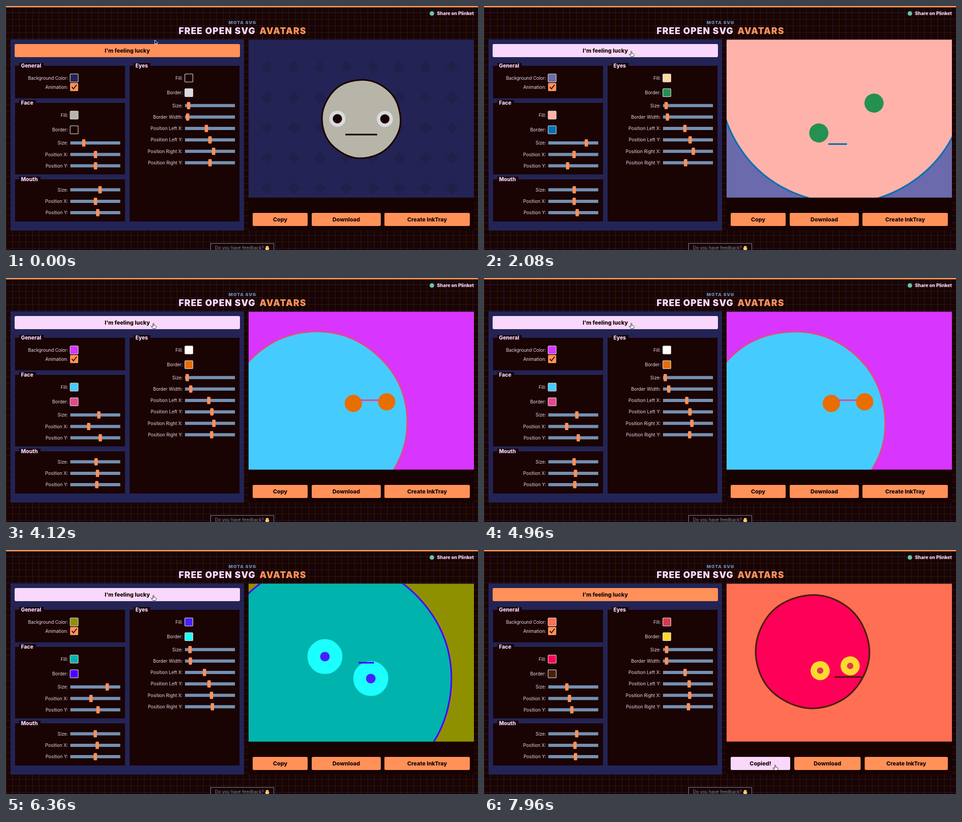
Recreate the animation shown at these times as an HTML page with a canvas. Size 1039 px wide and 539 px high, loop 8 s.

```html
<!DOCTYPE html>
<html lang="en">
<head>
<meta charset="utf-8">
<title>Free Open SVG Avatars</title>
<style>
  html, body { margin: 0; width: 100%; height: 100%; overflow: hidden; background: #190403; }
  canvas { display: block; width: 1039px; height: 539px; }
</style>
</head>
<body>
<canvas id="stage" width="1039" height="539"></canvas>
<script>
const ctx = document.getElementById('stage').getContext('2d');
const LOOP = 8000;
const DARK = '#190303', NAVY = '#232455', ORANGE = '#ff9159', PINK = '#f9d8fb', BLUE = '#7590b0';

// colors: background, face, face border, eye fill, eye border
// face: x, y, r; mouth: x, y, length; eyes: left x, y, right x, y, radius, border
const scenes = [
  { at: 0, colors: [NAVY, '#b6b5a8', '#1a0000', '#1a0000', '#dadae0'],
    face: [782, 249.5, 86.5], mouth: [747, 284, 70], eyes: [729.5, 249, 834, 249.5, 14, 7.5] },
  { at: 720, colors: ['#d8b2ff', '#ff9300', '#e2dca4', '#454558', '#d8204f'],
    face: [768, 148, 159.5], mouth: [753, 291, 90], eyes: [706, 273.5, 820.5, 263, 14, 7] },
  { at: 1680, colors: ['#6b6aac', '#ffb2a9', '#0070b3', '#ffd9a8', '#249052'],
    face: [790, 163.4, 272], mouth: [758, 305, 41], eyes: [737, 280.5, 858.5, 214.5, 10.5, 21] },
  { at: 2640, colors: ['#006eac', '#d98fab', '#5cb554', '#0e62b4', '#ff6c52'],
    face: [827.5, 277, 80], mouth: [758, 253, 69], eyes: [723, 235.5, 824, 256, 10.5, 35] },
  { at: 4080, colors: ['#d835ff', '#46cbff', '#e5478f', '#ffffff', '#e86e00'],
    face: [683, 318.5, 200.5], mouth: [780, 270, 40], eyes: [764.5, 277, 838, 273.5, 3.5, 31] },
  { at: 5680, colors: ['#8f9000', '#00b3ad', '#4b00ff', '#4820ff', '#1bffff'],
    face: [716.5, 286, 264], mouth: [776, 249, 34], eyes: [702, 235.5, 803, 284, 24.5, 28] },
  { at: 6640, colors: ['#ff6f54', '#ff0058', '#4a1f0a', '#d8394f', '#ffd92e'],
    face: [723, 224.5, 125], mouth: [772, 280.5, 60], eyes: [740, 266.5, 806, 256, 14, 14] }
];

function rect(x, y, x2, y2, color, radius = 0) {
  ctx.fillStyle = color;
  ctx.beginPath();
  ctx.roundRect(x, y, x2 - x, y2 - y, radius);
  ctx.fill();
}

function text(str, x, y, size, weight, color, align = 'left', spacing = 0) {
  ctx.font = `${weight} ${size}px Inter, "Open Sans", sans-serif`;
  ctx.letterSpacing = spacing + 'px';
  ctx.textAlign = align;
  ctx.fillStyle = color;
  ctx.fillText(str, x, y + size * 0.36);
}

function disc(x, y, r, color) {
  ctx.fillStyle = color;
  ctx.beginPath();
  ctx.arc(x, y, r, 0, Math.PI * 2);
  ctx.fill();
}

function button(x, x2, y, y2, label, hot) {
  rect(x, y, x2, y2, hot ? PINK : ORANGE, 3);
  text(label, (x + x2) / 2, (y + y2) / 2, 12.2, 800, '#160404', 'center');
}

function group(x, y, x2, y2, title, width) {
  rect(x, y, x2, y2, DARK);
  rect(x + 9, y - 6, x + 18 + width, y + 7, DARK);
  text(title, x + 13, y, 11.5, 800, PINK);
}

function label(str, x, y) {
  text(str, x - 4.5, y, 10, 400, '#ecd9e8', 'right');
}

function swatch(str, x, y, color) {
  label(str, x, y);
  rect(x - 0.5, y - 9.5, x + 18.5, y + 9.5, '#d9cfc8', 2.5);
  rect(x + 0.8, y - 8.2, x + 17.2, y + 8.2, color, 1.5);
}

function slider(str, x, y, value) {
  label(str, x, y);
  rect(x + 0.5, y - 3.5, x + 110.5, y + 3.5, BLUE);
  rect(value - 3.7, y - 8, value + 3.7, y + 8, ORANGE, 1.5);
}

function drawPage() {
  rect(0, 0, 1039, 539, '#190403');
  for (let i = 0; i < 72; i++) {
    const p = Math.round(i * 14.47);
    const color = i % 2 ? 'rgba(60,62,120,.38)' : 'rgba(66,60,30,.42)';
    rect(p, 3, p + 1, 539, color);
    if (p < 539) rect(0, p, 1039, p + 1, color);
  }
  rect(0, 0, 1039, 3, ORANGE);
  disc(937.5, 16.5, 5, '#68c3ae');
  text('Share on Plinket', 1030, 16.5, 10.2, 800, PINK, 'right');
  text('MOTA SVG', 490, 37, 9.6, 900, '#6a86b2', 'left', 1.1);
  text('FREE OPEN SVG', 380, 54.5, 19.5, 900, PINK, 'left', 1.25);
  text('AVATARS', 558, 54.5, 19.5, 900, ORANGE, 'left', 1.25);

  rect(450, 524, 590, 545, DARK);
  ctx.strokeStyle = BLUE;
  ctx.lineWidth = 1;
  ctx.strokeRect(450.5, 524.5, 139, 20);
  text('Do you have feedback?', 460, 535, 9.7, 400, BLUE);
  disc(575, 533.5, 3.5, '#ffd045');
  rect(570.5, 535, 579.5, 539, '#f3d9a0', [0, 0, 4, 4]);
  disc(575, 534.5, 1, '#e8741e');
}

function drawControls(s, luckyHot) {
  const [bg, fill, border, eyeFill, eyeBorder] = s.colors;
  const [fx, fy, fr] = s.face, [mx, my, ml] = s.mouth;
  const [lx, ly, rx, ry, er, eb] = s.eyes;
  const pos = (base, d) => base + d / 6.6, size = (base, d) => base + d / 3.43;

  rect(10, 74, 524, 496, NAVY);
  button(19, 515, 84, 113, "I'm feeling lucky", luckyHot);

  group(20, 132, 262, 204, 'General', 45);
  swatch('Background Color:', 141, 159, bg);
  label('Animation:', 141, 179);
  rect(141, 170, 159, 188, ORANGE, 2);
  ctx.strokeStyle = '#1a0505';
  ctx.lineWidth = 2;
  ctx.beginPath();
  ctx.moveTo(145, 179);
  ctx.lineTo(148.5, 183);
  ctx.lineTo(155.5, 174);
  ctx.stroke();

  group(20, 214, 262, 372, 'Face', 28);
  swatch('Fill:', 141, 241, fill);
  swatch('Border:', 141, 273.5, border);
  slider('Size:', 141, 302.5, size(171, fr - 86));
  slider('Position X:', 141, 328, pos(197, fx - 782));
  slider('Position Y:', 141, 353, pos(197, fy - 249));

  group(20, 383, 262, 476, 'Mouth', 38);
  slider('Size:', 141, 406, size(207, ml - 70));
  slider('Position X:', 141, 431.5, 197 + (mx - 747) / 7.5);
  slider('Position Y:', 141, 456.5, pos(202, my - 284));

  group(272, 132, 514, 476, 'Eyes', 28);
  swatch('Fill:', 393.5, 159, eyeFill);
  swatch('Border:', 393.5, 191.5, eyeBorder);
  const rows = [
    ['Size:', size(402, er - 14)],
    ['Border Width:', size(400, eb - 8)],
    ['Position Left X:', pos(441, lx - 729)],
    ['Position Left Y:', pos(449, ly - 249)],
    ['Position Right X:', pos(457, rx - 834)],
    ['Position Right Y:', pos(449, ry - 249)]
  ];
  rows.forEach(([name, value], i) => slider(name, 393.5, 220 + i * 25.25, value));
}

// Circle with a barely boiling, hand-drawn edge
function roughCircle(x, y, r, phase) {
  const steps = 180, depth = Math.min(0.3, r / 300);
  ctx.beginPath();
  for (let i = 0; i < steps; i++) {
    const a = i / steps * Math.PI * 2;
    const d = r + depth * (Math.sin(a * 5 + phase * 2.3) + Math.sin(a * 8 - phase * 1.7));
    ctx.lineTo(x + d * Math.cos(a), y + d * Math.sin(a));
  }
  ctx.closePath();
}

function drawDiamonds() {
  ctx.fillStyle = 'rgba(28,22,42,.22)';
  for (let x = 575; x < 1030; x += 58.1) {
    for (let y = 135; y < 424; y += 67) {
      ctx.beginPath();
      ctx.moveTo(x - 14, y);
      ctx.lineTo(x, y - 14);
      ctx.lineTo(x + 14, y);
      ctx.lineTo(x, y + 14);
      ctx.fill();
    }
  }
}

function drawAvatar(s, t) {
  const [bg, fill, border, eyeFill, eyeBorder] = s.colors;
  const [lx, ly, rx, ry, er, eb] = s.eyes;
  const [mx, my, ml] = s.mouth;
  const phase = Math.floor(t / 120);

  ctx.save();
  ctx.beginPath();
  ctx.rect(534, 74.5, 496, 349);
  ctx.clip();
  rect(534, 74, 1030, 424, bg);
  if (bg === NAVY) drawDiamonds();

  roughCircle(...s.face, phase);
  ctx.fillStyle = fill;
  ctx.fill();
  ctx.strokeStyle = border;
  ctx.lineWidth = 3.5;
  ctx.stroke();

  for (const [x, y] of [[lx, ly], [rx, ry]]) {
    roughCircle(x, y, er + eb / 2, phase);
    ctx.fillStyle = eyeBorder;
    ctx.fill();
    if (er > eb / 2) disc(x, y, er - eb / 2, eyeFill);
  }

  ctx.beginPath();
  ctx.moveTo(mx, my);
  ctx.lineTo(mx + ml, my);
  ctx.stroke();
  ctx.restore();
}

function drawActions(copied, copyHot) {
  rect(534, 423.5, 1030, 495, '#170202');
  const ends = copied ? [674, 683, 829, 838] : [664, 673, 825, 833];
  button(543, ends[0], 457, 486, copied ? 'Copied!' : 'Copy', copyHot);
  button(ends[1], ends[2], 457, 486, 'Download');
  button(ends[3], 1021, 457, 486, 'Create InkTray');
}

function ease(t, from, to) {
  const k = Math.min(1, Math.max(0, (t - from) / (to - from)));
  return k * k * (3 - 2 * k);
}

function drawCursor(x, y, hand) {
  const shape = hand
    ? 'M0 1Q1 -1 2 1V5L6 6Q7.5 6.5 7 9L6 12H0L-4 7.5Q-3.5 6 -2 7L0 8Z'
    : 'M0 0V9.5L2.2 7.6L3.8 11L5.4 10.2L3.9 7H6.8Z';
  const path = new Path2D(shape);
  ctx.save();
  ctx.translate(x, y);
  ctx.fillStyle = hand ? '#ffffff' : '#111111';
  ctx.strokeStyle = hand ? '#222222' : '#ffffff';
  ctx.lineWidth = 1;
  ctx.fill(path);
  ctx.stroke(path);
  ctx.restore();
}

function draw(t) {
  const scene = scenes.filter(s => t >= s.at).pop();
  const enter = ease(t, 0, 520), leave = ease(t, 6960, 7560);
  const x = 327.5 - 4 * enter + 316.5 * leave;
  const y = 75 + 24.5 * enter + 375 * leave;
  const luckyHot = y > 84 && y < 113;
  const copyHot = x > 543 && y > 457;

  drawPage();
  drawControls(scene, luckyHot);
  drawAvatar(scene, t);
  drawActions(t >= 7640, copyHot);
  drawCursor(x, y, luckyHot || copyHot);
}

function tick() {
  draw(performance.now() % LOOP);
  requestAnimationFrame(tick);
}
tick();
</script>
</body>
</html>
```
